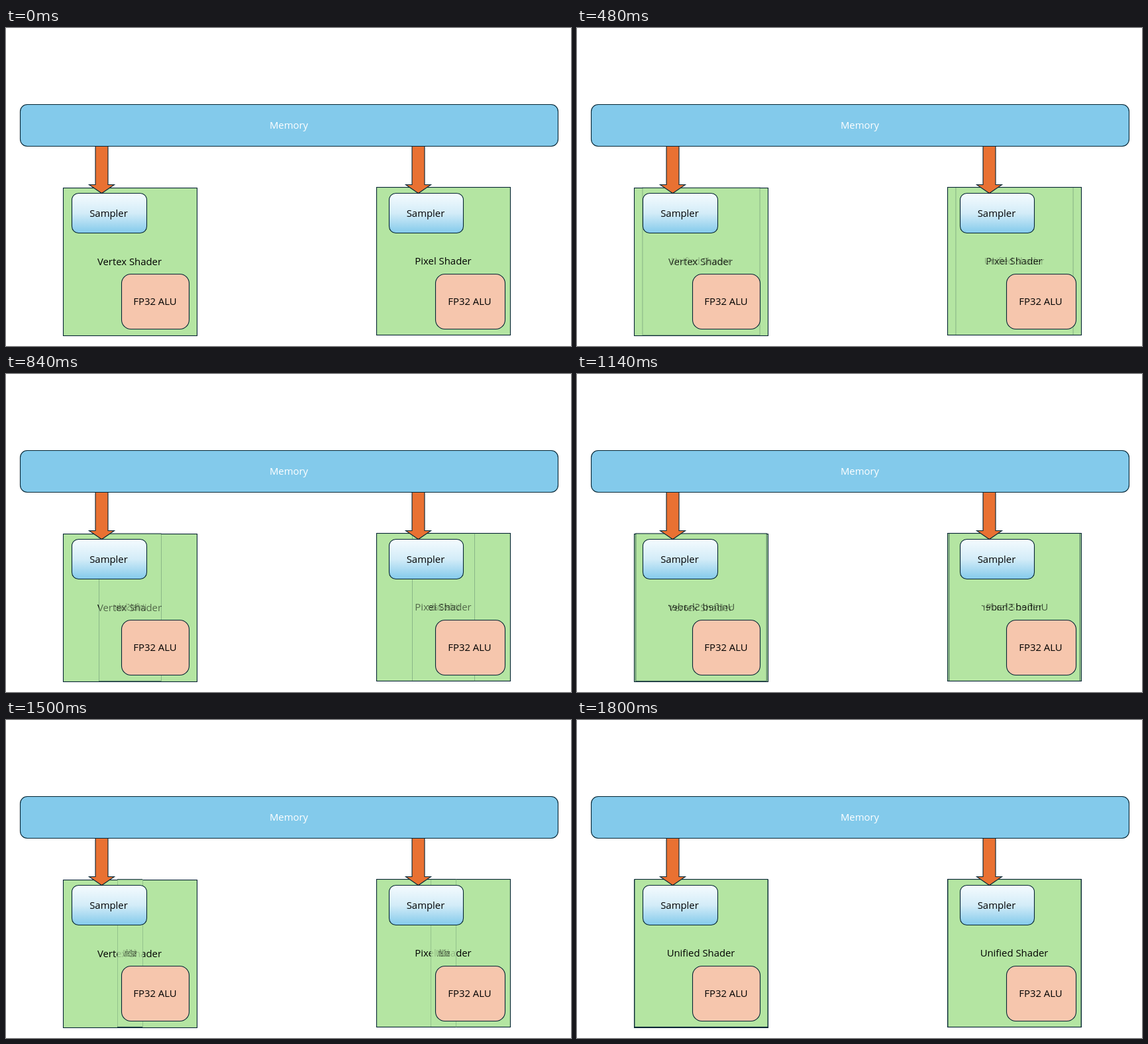
An HTML page for the animation above (1.86 s loop, 853 by 480 pixels).

```html
<!DOCTYPE html>
<html lang="en">
<head>
<meta charset="utf-8">
<title>Unified shaders</title>
<style>
  @property --step { syntax: "<number>"; inherits: false; initial-value: 0; }

  html, body { margin: 0; width: 100%; height: 100%; overflow: hidden; background: #fff; }
  svg { display: block; width: 853px; height: 480px; }

  rect, .arrow { stroke: #042433; stroke-width: 1.1; }
  text { font: 14.9px "Open Sans", "Noto Sans", sans-serif; text-anchor: middle; fill: #000; }
  .memory { fill: #83caeb; }
  .shader { fill: #b4e5a2; }
  .sampler { fill: url(#sky); }
  .alu { fill: #f6c6ad; }
  .arrow { fill: #e97132; }
  .light { fill: #fff; }

  /* One and a quarter turns while fading in, held for 60 ms per step */
  .swivel {
    transform-origin: 0 0;
    transform: scaleX(sin(var(--step) * 14.84deg));
    opacity: calc(var(--step) / 30.35);
    animation: swivel 1860ms steps(31) infinite;
  }
  @keyframes swivel { from { --step: 0; } to { --step: 31; } }
</style>
</head>
<body>
<svg viewBox="0 0 853 480">
  <defs>
    <linearGradient id="sky" x2="0" y2="1">
      <stop offset="0" stop-color="#f5fbfe"/>
      <stop offset=".5" stop-color="#d3ecf8"/>
      <stop offset="1" stop-color="#83caeb"/>
    </linearGradient>
    <path id="arrow" class="arrow" d="M-9.5 178.5H9.5V236.5H19L0 249.5L-19 236.5H-9.5Z"/>
    <g id="unified">
      <rect class="shader" x="-101" y="240.5" width="202" height="223"/>
      <text x="-.5" y="357">Unified Shader</text>
    </g>
  </defs>

  <rect class="memory" x="21.5" y="115.5" width="812" height="63" rx="10.5"/>
  <text class="light" x="427" y="152">Memory</text>

  <rect class="shader" x="86.5" y="241.5" width="202" height="223"/>
  <text x="186.5" y="358">Vertex Shader</text>
  <g transform="translate(187.5 0)"><g class="swivel"><use href="#unified"/></g></g>
  <rect class="sampler" x="99.5" y="249.5" width="113" height="60" rx="10"/>
  <text x="155" y="285">Sampler</text>
  <rect class="alu" x="174.5" y="371.5" width="102" height="83" rx="14"/>
  <text x="225" y="418">FP32 ALU</text>
  <use href="#arrow" x="144.5"/>

  <rect class="shader" x="559.5" y="240.5" width="202" height="223"/>
  <text x="660" y="357">Pixel Shader</text>
  <g transform="translate(660.5 0)"><g class="swivel"><use href="#unified"/></g></g>
  <rect class="sampler" x="578.5" y="249.5" width="112" height="60" rx="10"/>
  <text x="633.5" y="285">Sampler</text>
  <rect class="alu" x="648.5" y="371.5" width="105" height="83" rx="14"/>
  <text x="700" y="418">FP32 ALU</text>
  <use href="#arrow" x="622.5"/>
</svg>
</body>
</html>
```
